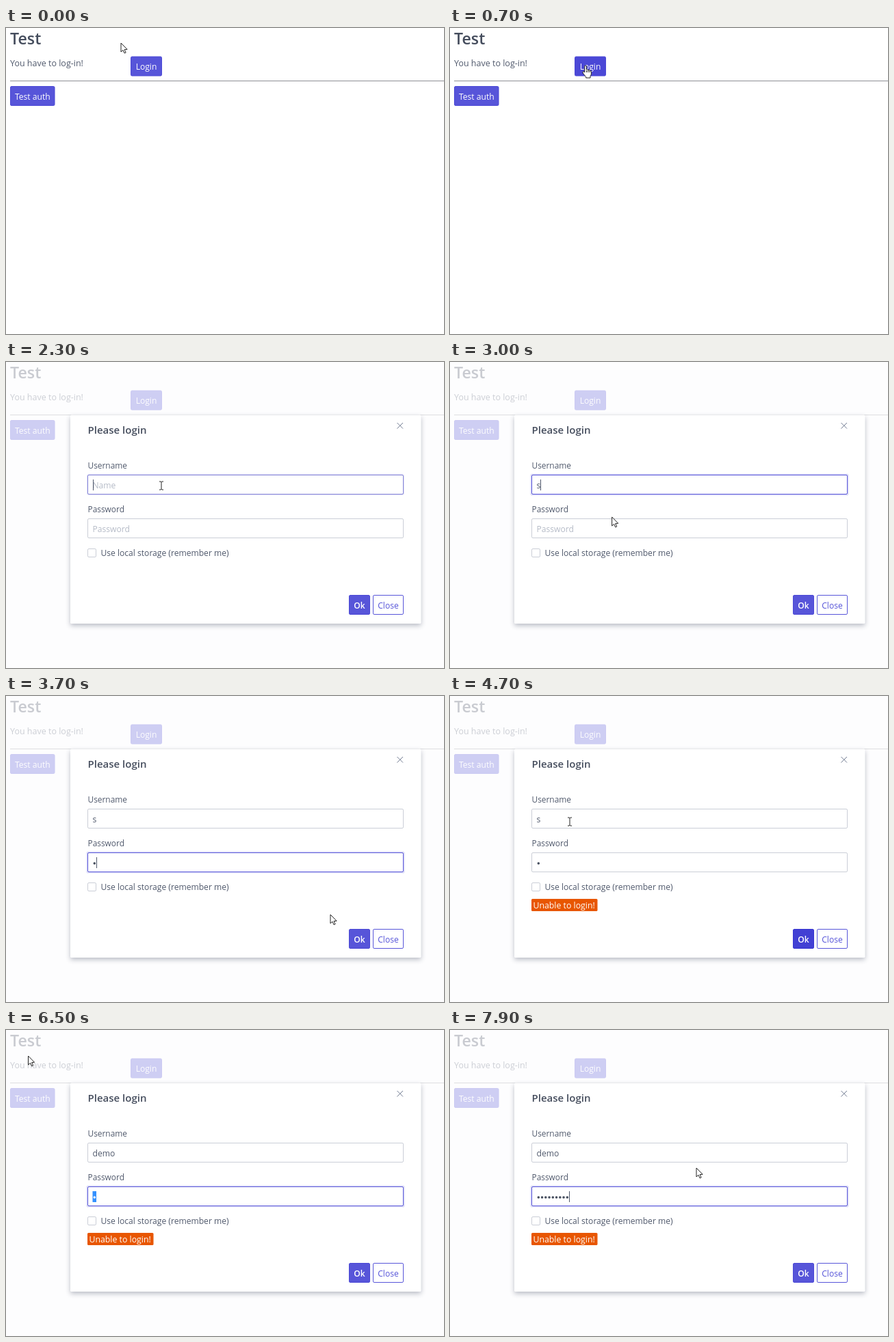
An HTML page with a canvas for the animation above (8 s loop, 640x448 px).

```html
<!DOCTYPE html>
<html lang="en">
<head>
<meta charset="utf-8">
<title>Login dialog</title>
<style>
html, body { margin: 0; width: 100%; height: 100%; overflow: hidden; background: #fff; }
canvas { display: block; }
</style>
</head>
<body>
<canvas id="stage" width="640" height="448"></canvas>
<script>
const W = 640, H = 448;
const stage = document.getElementById('stage').getContext('2d');
const layer = Object.assign(document.createElement('canvas'), { width: W, height: H }).getContext('2d');
let ctx = stage;

const LOOP = 8000, STEP = 100;
const FONT = '"Open Sans", "Noto Sans", sans-serif';
const PRIMARY = '#5755d9', DARK = '#4240d4', BODY = '#50596c', HEAD = '#454d5d';
const BORDER = '#caced7', HINT = '#b5bbc7';

// Times of the events
const OPEN = 1400, SLIDE = 1432, NAME_FOCUS = 2232, NAME_TYPED = 2800;
const PASS_FOCUS = 3100, PASS_TYPED = 3400, SUBMIT = 3900, FAIL = 4300;
const NAME_AGAIN = 4800, NAME_SELECTED = 5000, PASS_AGAIN = 6332;
const NEW_NAME = 'demo';
const nameKeys = [5500, 5900, 6000, 6100];
const passKeys = [6700, 6900, 7200, 7300, 7500, 7600, 7700, 7800, 7900];

// Pointer path: time, x, y
const path = [
  [0, 168, 22], [500, 199, 57], [700, 198, 55], [1800, 198, 55], [2300, 227, 181],
  [2800, 227, 181], [3100, 240, 243], [3300, 240, 243], [3700, 474, 320],
  [3900, 516, 354], [4200, 516, 354], [4500, 50, 195], [4700, 175, 184],
  [4800, 175, 184], [5100, 35, 190], [5400, 32.5, 38], [7500, 32.5, 38], [7900, 360, 202]
];

const clamp = v => Math.max(0, Math.min(1, v));
const typedCount = (keys, t) => keys.filter(k => t >= k).length;

function pointerAt(t) {
  const i = path.findIndex(k => k[0] > t);
  if (i < 0) return path[path.length - 1].slice(1);
  const [t0, x0, y0] = path[i - 1], [t1, x1, y1] = path[i];
  const u = (t - t0) / (t1 - t0), e = u * u * (3 - 2 * u);
  return [x0 + (x1 - x0) * e, y0 + (y1 - y0) * e];
}

// CSS "ease": cubic-bezier(.25, .1, .25, 1)
function ease(x) {
  if (x <= 0 || x >= 1) return clamp(x);
  let lo = 0, hi = 1;
  for (let i = 0; i < 24; i++) {
    const s = (lo + hi) / 2, q = 1 - s;
    if (0.75 * s * q * q + 0.75 * s * s * q + s * s * s < x) lo = s; else hi = s;
  }
  const q = 1 - lo;
  return 0.3 * lo * q * q + 3 * lo * lo * q + lo * lo * lo;
}

function text(str, x, y, color = BODY, size = 12.1, weight = 400, align = 'left') {
  ctx.font = `${weight} ${size}px ${FONT}`;
  ctx.textAlign = align;
  ctx.fillStyle = color;
  ctx.fillText(str, x, y);
}

function box(x, y, w, h, r, fill, stroke, line = 1) {
  ctx.beginPath();
  ctx.roundRect(x, y, w, h, r);
  if (fill) { ctx.fillStyle = fill; ctx.fill(); }
  if (stroke) { ctx.strokeStyle = stroke; ctx.lineWidth = line; ctx.stroke(); }
}

function button(label, x, y, w, fill, border, color, weight = 400) {
  box(x + 0.5, y + 0.5, w - 1, 28, 1.6, fill, border);
  text(label, x + w / 2, y + 19.5, color, 12.1, weight, 'center');
}

// Border and ring fade in together; focus runs from 0 to 1
function input(y, focus) {
  const ring = 1.6 * focus;
  if (ring) {
    box(119 - ring / 2, y - 0.5 - ring / 2, 462 + ring, 29 + ring, 2.4, null, 'rgba(87,85,217,.2)', ring);
  }
  box(119.5, y, 461, 28, 1.6, '#fff', BORDER);
  if (focus) box(119.5, y, 461, 28, 1.6, null, `rgba(87,85,217,${focus})`);
}

function caret(x, y) {
  ctx.fillStyle = BODY;
  ctx.fillRect(Math.round(x), y, 1, 16);
}

function highlight(w, y) {
  ctx.fillStyle = '#3390ff';
  ctx.fillRect(126.5, y, w, 16);
}

function page(hover) {
  text('Test', 6, 24, HEAD, 23.2, 600);
  text('You have to log-in!', 6, 56, BODY, 12.5);
  button('Login', 182, 41.5, 46, hover ? '#4b48d6' : PRIMARY, '#4b48d6', '#fff');
  ctx.fillStyle = '#8e9095';
  ctx.fillRect(6, 77, 634, 1);
  button('Test auth', 6, 85, 65.5, PRIMARY, '#4b48d6', '#fff');
}

function nameField(t) {
  const again = t >= NAME_AGAIN && t < PASS_AGAIN;
  const focused = again || (t >= NAME_FOCUS && t < PASS_FOCUS);
  const since = again ? NAME_AGAIN : NAME_FOCUS;
  input(165.5, focused ? ease((t - since) / 200) : 0);

  const count = typedCount(nameKeys, t);
  const value = count ? NEW_NAME.slice(0, count) : t >= NAME_TYPED ? 's' : '';
  const selected = t >= NAME_SELECTED && !count;
  ctx.font = `400 12.1px ${FONT}`;
  const width = ctx.measureText(value).width;
  if (selected) highlight(width, 172);
  text(value || 'Name', 126.5, 185, value ? (selected ? '#fff' : BODY) : HINT);
  if (focused && !selected) caret(126.5 + width, 172);
}

function passwordField(t) {
  const again = t >= PASS_AGAIN;
  const focused = again || (t >= PASS_FOCUS && t < SUBMIT);
  const since = again ? PASS_AGAIN : PASS_FOCUS;
  input(229.5, focused ? ease((t - since) / 200) : 0);

  const typed = typedCount(passKeys, t);
  const count = typed || (t >= PASS_TYPED ? 1 : 0);
  const selected = again && !typed;
  if (selected) highlight(5.5, 236);
  if (!count) text('Password', 126.5, 249, HINT);
  ctx.fillStyle = selected ? '#fff' : HEAD;
  for (let i = 0; i < count; i++) {
    ctx.beginPath();
    ctx.arc(129.3 + 5.25 * i, 245, 1.8, 0, 7);
    ctx.fill();
  }
  if (focused && !selected) caret(126.7 + 5.25 * count, 236);
}

function dialog(t) {
  ctx.save();
  ctx.shadowColor = 'rgba(48,55,80,.32)';
  ctx.shadowBlur = 7;
  ctx.shadowOffsetY = 3;
  box(94, 77.5, 512.5, 305.5, 1.6, '#fff');
  ctx.restore();

  text('Please login', 119.5, 104.5, HEAD, 15, 600);
  ctx.strokeStyle = '#727c92';
  ctx.lineWidth = 1;
  ctx.beginPath();
  ctx.moveTo(571.5, 89); ctx.lineTo(580, 97.5);
  ctx.moveTo(580, 89); ctx.lineTo(571.5, 97.5);
  ctx.stroke();

  text('Username', 119.5, 156, BODY, 11.9);
  nameField(t);
  text('Password', 119.5, 220, BODY, 11.9);
  passwordField(t);

  box(119.5, 273.5, 12, 12, 1.6, '#fff', BORDER);
  text('Use local storage (remember me)', 138.5, 284);
  if (t >= FAIL) {
    box(119, 297, 96.5, 18, 1.6, '#e85600');
    text('Unable to login!', 121.5, 311, '#fff', 12.3);
  }

  const pressed = t >= SUBMIT && t < NAME_AGAIN;
  button('Ok', 501, 341, 31, pressed ? DARK : PRIMARY, pressed ? '#3634d2' : '#4b48d6', '#fff', 600);
  button('Close', 536, 341, 45, '#fff', PRIMARY, PRIMARY);
}

// The dialog fades as one group, so it is drawn on its own layer first
function slideIn(t) {
  const p = ease((t - SLIDE) / 200);
  layer.clearRect(0, 0, W, H);
  ctx = layer;
  dialog(t);
  ctx = stage;
  ctx.save();
  ctx.globalAlpha = p;
  ctx.drawImage(layer.canvas, 0, Math.round(-25.6 * (1 - p)));
  ctx.restore();
}

function arrow() {
  ctx.beginPath();
  [[0, 0], [0, 13], [3, 10.3], [5.1, 14.9], [7.1, 14], [5.1, 9.6], [9.1, 9.3]]
    .forEach(([x, y]) => ctx.lineTo(x, y));
  ctx.closePath();
  ctx.fill();
  ctx.stroke();
}

const handShape = new Path2D('M-1.2 10V1.2Q-1.2 0 0 0Q1.4 0 1.4 1.2V6' +
  'Q2.8 5 3.9 6.6Q5.3 5.7 6.2 7.2Q8.4 6.6 8.4 9V12Q8.4 14 7 15.5V18H.6V16.5' +
  'Q-1.6 14-3.9 11Q-4.6 9-3 8.6Q-2 8.8-1.2 10Z');

function hand() {
  ctx.fill(handShape);
  ctx.stroke(handShape);
  ctx.beginPath();
  for (const x of [1.6, 3.9, 6.2]) { ctx.moveTo(x, 7); ctx.lineTo(x, 10); }
  ctx.stroke();
}

function beam() {
  ctx.beginPath();
  for (const s of [-1, 1]) {
    ctx.moveTo(-3, s * 6); ctx.lineTo(-0.8, s * 6);
    ctx.lineTo(0, s * 5.2); ctx.lineTo(0.8, s * 6); ctx.lineTo(3, s * 6);
  }
  ctx.moveTo(0, -5.2);
  ctx.lineTo(0, 5.2);
  ctx.stroke();
}

function inside([x, y], l, t, r, b) {
  return x >= l && x <= r && y >= t && y <= b;
}

function pointer(t, pos) {
  let shape = arrow;
  if (t <= 1800) {
    if (inside(pos, 182, 42, 228, 71)) shape = hand;
  } else if (inside(pos, 119, 165, 581, 194) || inside(pos, 119, 229, 581, 258)) {
    shape = beam;
  } else if (inside(pos, 501, 341, 581, 371)) {
    shape = hand;
  }
  ctx.save();
  ctx.translate(pos[0], pos[1]);
  ctx.fillStyle = '#fff';
  ctx.strokeStyle = '#222';
  ctx.lineWidth = 1;
  ctx.lineJoin = 'round';
  shape();
  ctx.restore();
}

function draw(t) {
  const pos = pointerAt(t);
  ctx.fillStyle = '#fff';
  ctx.fillRect(0, 0, W, H);
  page(t < OPEN && inside(pos, 182, 42, 228, 71));
  if (t >= OPEN) {
    ctx.fillStyle = 'rgba(253,253,254,.72)';
    ctx.fillRect(0, 0, W, H);
    slideIn(t);
  }
  pointer(t, pos);
}

const start = performance.now();
function tick() {
  const t = (performance.now() - start) % LOOP;
  draw(Math.floor(t / STEP) * STEP);
  requestAnimationFrame(tick);
}
tick();
</script>
</body>
</html>
```
